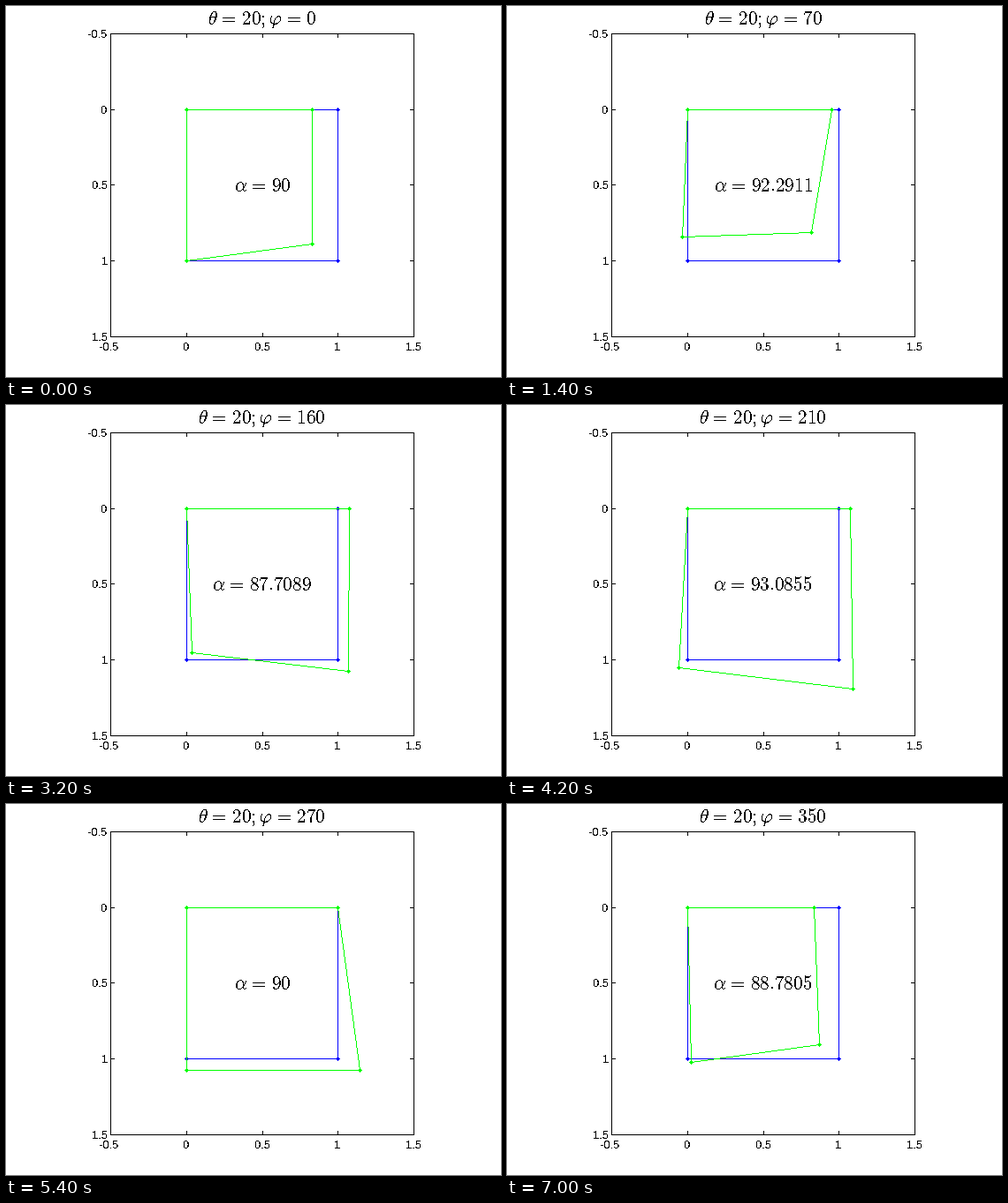
Animation, 560 px wide and 420 px high, one loop 7.2 s. Source, as a matplotlib script:

```python
import numpy as np
import matplotlib.pyplot as plt
from matplotlib.animation import FuncAnimation
from matplotlib.collections import PolyCollection

W, H, DPI = 560, 420, 100
PX = 72 / DPI                                 # one pixel in points
LEFT, RIGHT, TOP, BOTTOM = 118, 461, 31, 374  # plot box
X0, Y0, UNIT = 204.44, 117.4, 171.15          # data origin and scale
TICK = 4
THETA = 20
DISTANCE = 2.665                              # viewer to plane
STEP = 10
BLUE, GREEN = "#0000ff", "#00ff00"
CORNERS = np.array([[0, 0], [1, 0], [1, 1], [0, 1]], float)
CELL = 0.5 + 0.45 * np.array([[-1, -1], [1, -1], [1, 1], [-1, 1]])
DOT = np.array([(x, y) for x in range(-2, 3) for y in range(-2, 3)
                if abs(x) + abs(y) <= 2])

plt.rcParams["mathtext.fontset"] = "cm"
fig = plt.figure(figsize=(W / DPI, H / DPI), dpi=DPI, facecolor="white")
ax = fig.add_axes([0, 0, 1, 1])
ax.set_xlim(0, W)
ax.set_ylim(H, 0)
ax.axis("off")


def to_pixels(points):
    return np.floor(np.array([X0, Y0]) + UNIT * points)


def segment(a, b):
    """Pixels of a one-pixel-wide line without smoothing."""
    a, b = np.array(a, float), np.array(b, float)
    count = int(np.abs(b - a).max())
    t = np.linspace(0, 1, count + 1)[:, None]
    return np.floor(a + (b - a) * t + 0.5)


def outline(points):
    return [segment(a, b) for a, b in zip(points, np.roll(points, -1, axis=0))]


def cells(parts):
    return np.concatenate(parts)[:, None, :] + CELL


class Shape:
    """Crisp pixel lines in one colour."""

    def __init__(self, color, z):
        self.body = PolyCollection([], facecolors=color, edgecolors="none",
                                   linewidths=0, antialiaseds=False, zorder=z)
        self.body.set_snap(False)
        ax.add_collection(self.body, autolim=False)

    def draw(self, parts):
        self.body.set_verts(cells(parts))

    def quad(self, corners):
        points = to_pixels(corners)
        self.draw(outline(points) + [point + DOT for point in points])


def tilt(phi):
    """Corners of the tilted square seen in perspective, and its angle."""
    c, s = np.cos(phi), np.sin(phi)
    theta = np.radians(THETA)
    shrink = 1 - np.cos(theta)
    flat = np.array([[1 - shrink * c * c, -shrink * c * s],
                     [-shrink * c * s, 1 - shrink * s * s]])
    depth = CORNERS @ [c, s] * np.sin(theta)
    points = CORNERS @ flat / (1 + depth / DISTANCE)[:, None]

    # Turn the top edge back to horizontal.
    top = np.arctan2(flat[0, 1], flat[0, 0])
    side = np.arctan2(flat[1, 1], flat[1, 0])
    ct, st = np.cos(top), np.sin(top)
    return points @ np.array([[ct, -st], [st, ct]]), np.degrees(side - top)


def label(x, y, text, ha):
    ax.text(x, y, text, family="Liberation Sans", size=13 * PX, ha=ha,
            va="baseline", antialiased=False)


def formula(y):
    return ax.text(289.8, y, "", size=21.33 * PX, ha="center", va="baseline",
                   zorder=6, antialiased=False)


def draw_axes():
    parts = outline(np.array([[LEFT, TOP], [RIGHT, TOP],
                              [RIGHT, BOTTOM], [LEFT, BOTTOM]]))
    for value in np.arange(-0.5, 1.6, 0.5):
        x, y = to_pixels(np.array([value, value]))
        parts += [segment((x, TOP), (x, TOP + TICK)),
                  segment((x, BOTTOM), (x, BOTTOM - TICK)),
                  segment((LEFT, y), (LEFT + TICK, y)),
                  segment((RIGHT, y), (RIGHT - TICK, y))]
        # The minus sign hangs out to the left of the centred number.
        hang = 2 if value < 0 else 0
        label(x - hang, 390, f"{value:g}", "center")
        label(115, y + 5, f"{value:g}", "right")
    Shape("black", 1).draw(parts)


draw_axes()
base = Shape(BLUE, 2)
base.quad(CORNERS)
view = Shape(GREEN, 4)
title = formula(21)
angle = formula(210)
EQUALS = r"\hspace{0.116}=\hspace{0.116}"


def update(i):
    phi = STEP * i
    corners, alpha = tilt(np.radians(phi))
    view.quad(corners)
    title.set_text(rf"$\theta{EQUALS}{THETA};\varphi{EQUALS}{phi}$")
    angle.set_text(rf"$\alpha{EQUALS}{alpha:.6g}$")
    return [view.body, title, angle]


anim = FuncAnimation(fig, update, frames=360 // STEP, interval=200,
                     repeat=True, repeat_delay=0, blit=False)
plt.show()
```
